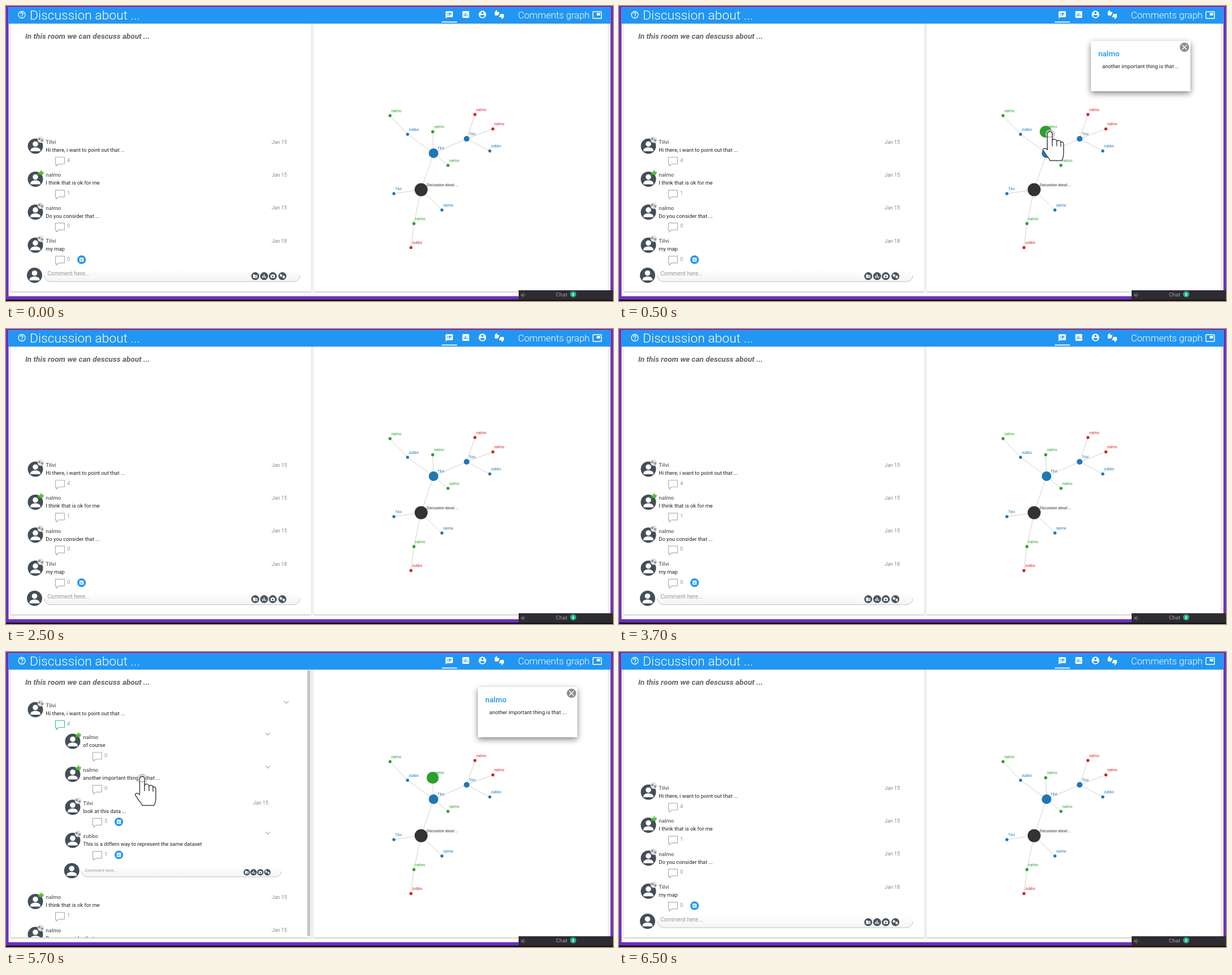
Write an HTML page that moves like this. It is 1074 by 522 pixels and loops after 8 s.

```html
<!DOCTYPE html>
<html lang="en">
<head>
<meta charset="utf-8">
<title>Discussion room</title>
<style>
  html, body { margin: 0; width: 100%; height: 100%; overflow: hidden; background: #fff; }
  svg { display: block; width: 1074px; height: 522px; font-family: Roboto, "Open Sans", sans-serif; }
  .list { animation: list 8s step-end infinite; }
  .thread { animation: thread 8s step-end infinite; }
  .focus { animation: focus 8s step-end infinite; }
  .tap { animation: tap 8s step-end infinite; }
  @keyframes list { 0%, 81.25% { visibility: visible } 56.25% { visibility: hidden } }
  @keyframes thread { 0%, 81.25%, 100% { visibility: hidden } 56.25% { visibility: visible } }
  @keyframes focus {
    0%, 31.25%, 81.25%, 100% { visibility: hidden }
    6.25%, 56.25% { visibility: visible }
  }
  @keyframes tap { 0%, 31.25%, 100% { visibility: hidden } 6.25% { visibility: visible } }
</style>
</head>
<body>
<svg viewBox="0 0 1074 522" xmlns="http://www.w3.org/2000/svg">
  <defs>
    <symbol id="help" viewBox="0 0 24 24">
      <circle cx="12" cy="12" r="9" fill="none" stroke="currentColor" stroke-width="2"/>
      <path d="M9 10a3 3 0 1 1 5 2c-1.200 1-2 1.500-2 3M12 16v2" fill="none" stroke="currentColor" stroke-width="2"/>
    </symbol>
    <symbol id="notes" viewBox="0 0 24 24">
      <path fill="currentColor" fill-rule="evenodd" d="M4 2H20a2 2 0 0 1 2 2V16a2 2 0 0 1-2 2H6l-4 4V4a2 2 0 0 1 2-2zM6 6v2h2V6zm4 0v2h8V6zM6 9v2h2V9zm4 0v2h8V9zM6 12v2h2v-2zm4 0v2h5v-2z"/>
    </symbol>
    <symbol id="chart" viewBox="0 0 24 24">
      <path fill="currentColor" fill-rule="evenodd" d="M5 3H19a2 2 0 0 1 2 2V19a2 2 0 0 1-2 2H5a2 2 0 0 1-2-2V5a2 2 0 0 1 2-2zM7 10v7h2v-7zm4-3v10h2V7zm4 6v4h2v-4z"/>
    </symbol>
    <symbol id="bars" viewBox="0 0 24 24">
      <path stroke="currentColor" stroke-width="4" d="M5 20V10M12 20V3M19 20v-7"/>
    </symbol>
    <symbol id="user" viewBox="0 0 24 24">
      <path fill="currentColor" fill-rule="evenodd" d="M2 12a10 10 0 1 1 20 0a10 10 0 1 1-20 0zM9 8a3 3 0 1 0 6 0a3 3 0 1 0-6 0zM6 16c2 4 10 4 12 0c0-4-12-4-12 0z"/>
    </symbol>
    <symbol id="like" viewBox="0 0 24 24">
      <path fill="currentColor" d="M1 21h4V9H1zM23 10c0-1.100-.9-2-2-2h-6.300l1-5L14.200 1 7 8.500V21h12l4-9z"/>
    </symbol>
    <symbol id="thumb" viewBox="0 0 13 15">
      <path fill="currentColor" d="M12 6c0-.6-.4-1-1-1H5.800l.7-3.400L5.400 0 0 5.400V12.500c0 .8.700 1.500 1.500 1.500h6.800c.6 0 1.100-.4 1.400-1L12 7.500z"/>
    </symbol>
    <symbol id="thumbs" viewBox="0 0 24 24">
      <use href="#thumb" width="13" height="15"/>
      <use href="#thumb" width="13" height="15" transform="rotate(180 12 12)"/>
    </symbol>
    <symbol id="pip" viewBox="0 0 24 24">
      <rect x="2" y="4" width="20" height="16" rx="1" fill="none" stroke="currentColor" stroke-width="2"/>
      <path fill="currentColor" d="M11 7h8v6h-8z"/>
    </symbol>
    <symbol id="folder" viewBox="0 0 24 24">
      <path fill="currentColor" fill-rule="evenodd" d="M2 4h8l2 3h10v13H2zM14 10v3h-3v2h3v3h2v-3h3v-2h-3v-3z"/>
    </symbol>
    <symbol id="camera" viewBox="0 0 24 24">
      <path fill="currentColor" fill-rule="evenodd" d="M2 6h5l2-3h6l2 3h5v14H2zM8 13a4 4 0 1 0 8 0a4 4 0 1 0-8 0z"/>
    </symbol>
    <g id="avatar">
      <circle r="13.500" fill="#434e58"/>
      <circle cy="-3.800" r="4.800" fill="#fff"/>
      <path d="M-8.800 9V7C-8.500 .6 8.500 .6 8.800 7V9z" fill="#fff"/>
    </g>
    <g id="hand" stroke="#444" stroke-width="1.500" stroke-linejoin="round" stroke-linecap="round">
      <circle r="8" fill="#fff" fill-opacity=".6" stroke="#888" stroke-width="1"/>
      <path fill="#fff" d="M-4.500 28V0a4.300 4.300 0 0 1 8.600 0V12c1-4 7-4 8 1c2-3 6.500-2 7 2c2-2 5-1 5 3V33C24 43 22 44 21 47H0C-1 43-4 41-6 38L-12 29C-13.500 25-8 24-4.500 28z"/>
      <path fill="none" d="M4.100 12v9M12.100 13v8M19.100 15v7"/>
      <circle r="5.500" fill="none" stroke="#888" stroke-width="1"/>
    </g>
    <linearGradient id="field" x2="0" y2="1">
      <stop stop-color="#fff"/><stop offset="1" stop-color="#f4f4f4"/>
    </linearGradient>
    <filter id="cardShade" x="-5%" y="-5%" width="110%" height="110%">
      <feDropShadow dx="0" dy="1" stdDeviation="1" flood-opacity=".28"/>
    </filter>
    <filter id="popShade" x="-20%" y="-20%" width="140%" height="160%">
      <feDropShadow dx="0" dy="4" stdDeviation="5.500" flood-opacity=".5"/>
    </filter>
    <clipPath id="pane"><path d="M8 31h532v474H8z"/></clipPath>
  </defs>

  <path fill="#6c2fc0" d="M0 0h1074v520H0z"/>
  <path fill="#111" d="M0 519.500h1074V522H0z"/>
  <path fill="#fafafa" d="M4.500 2.500h1065v511h-1065z"/>
  <g fill="#fff" filter="url(#cardShade)">
    <path d="M8 28h532v477H8z"/>
    <path d="M544 28h521v477H544z"/>
  </g>
  <path fill="#2196f3" d="M4.500 2.500h1065V31h-1065z"/>
  <path fill="#000" fill-opacity=".12" d="M4.500 31h1065v1.200h-1065z"/>

  <g color="#fff" fill="#fff">
    <use href="#help" x="20" y="7.500" width="16" height="16"/>
    <text x="42" y="24" font-size="22.900" font-weight="300">Discussion about ...</text>
    <use href="#notes" x="776.500" y="8" width="15.500" height="15.500"/>
    <path d="M771 27.500h27v1.700h-27z"/>
    <use href="#chart" x="805.500" y="7" width="16" height="16"/>
    <use href="#user" x="835" y="7" width="16" height="16"/>
    <use href="#thumbs" x="864.500" y="7" width="16.500" height="16.500"/>
    <text x="906" y="21.700" font-size="16.600" font-weight="300">Comments graph</text>
    <use href="#pip" x="1037" y="7" width="18" height="18"/>
  </g>
  <text x="34" y="58" font-size="13.620" font-weight="700" font-style="italic" fill="#666">In this room we can descuss about ...</text>

  <g id="list" class="list" clip-path="url(#pane)"></g>
  <g id="thread" class="thread" clip-path="url(#pane)"></g>
  <g id="graph" font-size="6.400"></g>

  <g class="focus">
    <path d="M835 62h176v88.500H835z" fill="#fff" filter="url(#popShade)"/>
    <circle cx="1000.500" cy="73" r="8.300" fill="#8e8e8e"/>
    <path d="M996.500 69l8 8m0-8l-8 8" stroke="#fff" stroke-width="1.400"/>
    <text x="848" y="89" font-size="13.500" font-weight="500" fill="#2196f3">nalmo</text>
    <text x="855" y="110" font-size="9.400" fill="#222">another important thing is that ...</text>
  </g>
  <use href="#hand" class="tap" x="762.500" y="226.500"/>
  <use href="#hand" class="thread" x="241" y="224.500"/>

  <path fill="#2e2b31" d="M907 503h167v17H907z"/>
  <path d="M911.500 510h2l2.500-2.500v8l-2.500-2.500h-2zM918 509.500q2 2 0 4" fill="#666" stroke="#666" stroke-width=".7"/>
  <text x="973" y="513.500" font-size="9.700" fill="#a0a0a0">Chat</text>
  <circle cx="1003.500" cy="510" r="5.500" fill="#1fab89"/>
  <text x="1003.500" y="512.700" font-size="7" font-weight="700" fill="#fff" text-anchor="middle">0</text>
</svg>
<script>
  const A = "Tilvi", B = "nalmo", C = "zubbo";
  const BLUE = "#1f77b4", GREEN = "#2ca02c", RED = "#d62728";
  const put = (id, html) => { document.getElementById(id).innerHTML = html; };
  const text = (x, y, size, fill, str, extra = "") =>
    `<text x="${x}" y="${y}" font-size="${size}" fill="${fill}" ${extra}>${str}</text>`;
  const icon = (id, x, y, size, color) =>
    `<use href="#${id}" x="${x - size / 2}" y="${y - size / 2}" width="${size}" height="${size}" color="${color}"/>`;
  const disc = (id, x, y, r, fill) =>
    `<circle cx="${x}" cy="${y}" r="${r}" fill="${fill}"/>` + icon(id, x, y, r * 1.3, "#fff");

  // One comment; x and y are the centre of its avatar.
  function comment(x, y, name, body, count, o = {}) {
    const badge = o.liked
      ? icon("like", 10, -11.5, 10.5, "#4fc72a")
      : `<circle cx="9.500" cy="-11.500" r="5.700" fill="#e4e4e4"/>` + icon("thumbs", 9.5, -11.5, 9, "#999");
    const corner = o.date
      ? text(o.right - 26 - x, -4.5, 9, "#888", o.date)
      : `<path d="M${o.right - 4 - x} -15l4 4 4-4" fill="none" stroke="#aaa" stroke-width="1.200"/>`;
    return `<g transform="translate(${x} ${y})"><use href="#avatar"/>${badge}` +
      text(18.3, -4, 9.7, "#666", name, 'font-weight="500"') +
      text(18.3, 10, 9.4, "#222", body) +
      `<path d="M35.500 19.500h16v12h-10l-5 4q1-2 0-4h-1z" fill="none" stroke="${o.open ? "#26c6a0" : "#a9b1b8"}" stroke-width="1.200"/>` +
      text(56, 27.5, 9.7, "#999", count) +
      (o.chart ? disc("chart", 81.7, 25.7, 7.6, "#2196f3") : "") + corner + "</g>";
  }

  function field(x, right, y, h, size, icons, r) {
    const q = h / 2, top = y - q;
    const ids = ["folder", "bars", "camera", "thumbs"];
    return `<rect x="${x}" y="${top}" width="${right - x}" height="${h}" rx="${q}" fill="url(#field)"/>` +
      `<path d="M${x} ${top + q}a${q} ${q} 0 0 0 ${q} ${q}H${right - q}a${q} ${q} 0 0 0 ${q} ${-q}" fill="none" stroke="#c4c4c4"/>` +
      text(x + 5.2, y + .4, size, "#999", "Comment here...") +
      icons.map((cx, i) => disc(ids[i], cx, y + 1.3, r, "#4a545d")).join("");
  }

  const day = (n, right = 496) => ({ date: "Jan " + n, right });
  put("list",
    comment(52, 248, A, "Hi there, i want to point out that ...", 4, day(15)) +
    comment(52, 306.4, B, "I think that is ok for me", 1, { ...day(15), liked: true }) +
    comment(52, 364.7, B, "Do you consider that ...", 0, day(15)) +
    comment(52, 423.2, A, "my map", 0, { ...day(18), chart: true }) +
    '<use href="#avatar" x="50.500" y="476.500"/>' +
    field(68, 520, 476.8, 22, 10.2, [441, 456.7, 472, 489], 7));

  put("thread",
    comment(52, 102, A, "Hi there, i want to point out that ...", 4, { right: 496, open: true }) +
    comment(118, 158, B, "of course", 0, { right: 463, liked: true }) +
    comment(118, 216.4, B, "another important thing is that ...", 0, { right: 463, liked: true }) +
    comment(118, 274.8, A, "look at this data ...", 3, { ...day(15, 463), chart: true }) +
    comment(118, 333.3, C, "This is a differn way to represent the same dataset", 1, { right: 463, chart: true }) +
    '<use href="#avatar" x="116.300" y="387"/>' +
    field(134, 487, 388.5, 19, 7.9, [426, 438, 450, 462.5], 5.7) +
    comment(52, 441.4, B, "I think that is ok for me", 1, { ...day(15), liked: true }) +
    comment(52, 499.8, B, "Do you consider that ...", 0, day(15)) +
    '<rect x="533" y="32" width="5.500" height="471" rx="2" fill="#c6c6c6"/>');

  // Each node: x, y, radius, colour, label, parent index.
  const nodes = [
    [734.5, 325, 11.5, "#333", "Discussion about ..."],
    [756.5, 260.5, 8.5, BLUE, A, 0],
    [755, 222.5, 2.7, GREEN, B, 1],
    [782, 282, 2.7, GREEN, B, 1],
    [710.5, 227, 2.7, BLUE, C, 1],
    [679.5, 194, 2.7, GREEN, B, 4],
    [815, 235, 5, BLUE, A, 1],
    [829.7, 192, 2.7, RED, B, 6],
    [861.5, 217.5, 2.7, RED, B, 6],
    [856, 256.5, 2.7, BLUE, C, 6],
    [686.3, 332, 2.7, BLUE, A, 0],
    [771.3, 361, 2.7, BLUE, B, 0],
    [721.8, 385, 2.7, GREEN, B, 0],
    [716.5, 427.5, 2.7, RED, C, 12]
  ];
  const edges = nodes.slice(1).map(([x, y, , , , p]) =>
    `<path d="M${x} ${y}L${nodes[p][0]} ${nodes[p][1]}" stroke="#d0d0d0"/>`);
  const dots = nodes.map(([x, y, r, c]) => `<circle cx="${x}" cy="${y}" r="${r}" fill="${c}"/>`);
  const labels = nodes.map(([x, y, r, c, s]) => text(x + r * .85, y - 6.5, 6.4, c, s));
  put("graph", edges.join("") + dots.join("") +
    `<circle class="focus" cx="755" cy="222.500" r="10.600" fill="${GREEN}"/>` + labels.join(""));
</script>
</body>
</html>
```
